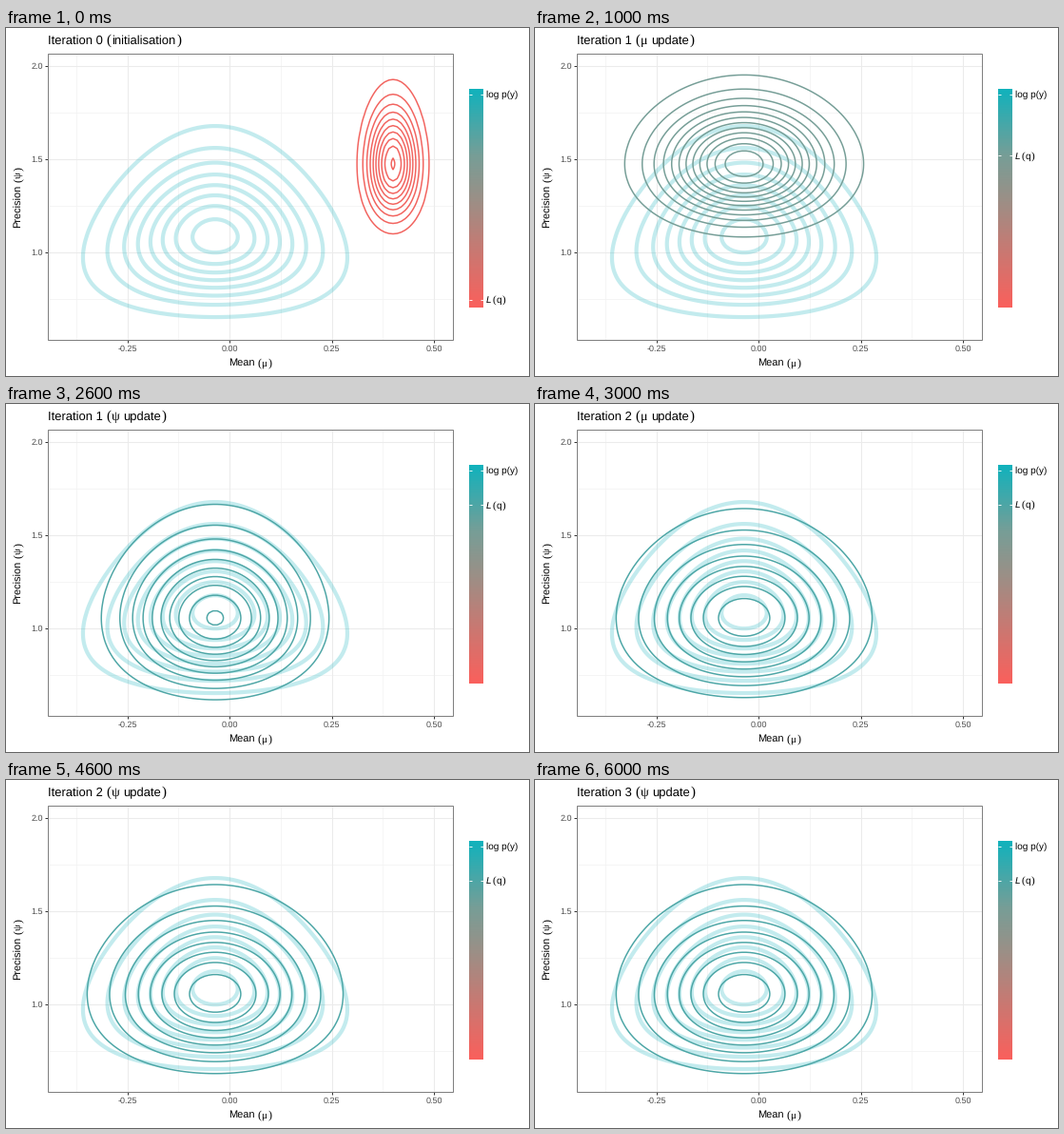
These frames come from a looping animation (550 by 366 pixels, 7 s). A matplotlib script:

```python
import matplotlib.pyplot as plt
import numpy as np
from matplotlib.animation import FuncAnimation
from matplotlib.colors import LinearSegmentedColormap
from matplotlib.patches import Rectangle

W, H, DPI = 550, 366, 100
PT = 72 / DPI  # points per pixel
SANS, SERIF = "Liberation Sans", "Liberation Serif"

plt.rcParams["text.hinting"] = "none"
plt.rcParams["text.hinting_factor"] = 1

TEAL, CORAL = "#11b2bc", "#fa605c"
RAMP = LinearSegmentedColormap.from_list(
    "ramp", [(0, TEAL), (0.3, "#769e97"), (0.5, "#9a9087"), (1, CORAL)])
BAR = (487, 501.5, 64.5, 294.5)  # left, right, top, bottom
LEFT, RIGHT, TOP, BOTTOM = 44, 470, 27, 328

fig = plt.figure(figsize=(W / DPI, H / DPI), dpi=DPI, facecolor="white")
ax = fig.add_axes([0, 0, 1, 1])
ax.set_xlim(0, W)
ax.set_ylim(H, 0)
ax.axis("off")


def px(mu):
    return 235 + 430 * mu


def py(psi):
    return 432 - 196 * psi


def line(x, y, color, width, z):
    ax.plot(x, y, color=color, lw=width * PT, zorder=z,
            solid_capstyle="butt")


def label(x, y, s, size, family=SANS, color="black", **kw):
    return ax.text(x, y, s, fontsize=size * PT, family=family, color=color,
                   va="baseline", zorder=9, **kw)


def panel():
    for mu in np.arange(-0.375, 0.5, 0.25):
        line([px(mu)] * 2, [TOP, BOTTOM], "#f3f3f3", 0.8, 0)
    for psi in (0.75, 1.25, 1.75):
        line([LEFT, RIGHT], [py(psi)] * 2, "#f3f3f3", 0.8, 0)
    for mu in (-0.25, 0, 0.25, 0.5):
        line([px(mu)] * 2, [TOP, BOTTOM], "#ebebeb", 1.07, 1)
        line([px(mu)] * 2, [BOTTOM, BOTTOM + 3], "#333333", 1, 1)
        label(px(mu), 340.3, f"{mu:.2f}", 8.8, color="#4d4d4d", ha="center")
    for psi in (1, 1.5, 2):
        line([LEFT, RIGHT], [py(psi)] * 2, "#ebebeb", 1.07, 1)
        line([LEFT - 3, LEFT], [py(psi)] * 2, "#333333", 1, 1)
        label(39, py(psi) + 3.3, f"{psi:.1f}", 8.8, color="#4d4d4d",
              ha="right")
    ax.add_patch(Rectangle((LEFT, TOP), RIGHT - LEFT, BOTTOM - TOP, fill=False,
                           ec="#7f7f7f", lw=PT, zorder=8))


def axis_titles():
    base = 355.3
    label(233.8, base, "Mean", 11)
    label(264.3, base, "(", 12, SERIF)
    label(268.3, base, "μ", 11.5, SERIF)
    label(275.8, base, ")", 12, SERIF)
    for y, s, size, family in ((210, "Precision", 11, SANS),
                               (161.7, "(", 12, SERIF),
                               (158, "ψ", 11, SERIF),
                               (150.3, ")", 12, SERIF)):
        # rotated text: the right edge of its box is the baseline side
        ax.text(16, y, s, fontsize=size * PT, family=family, rotation=90,
                rotation_mode="anchor", ha="left", va="baseline", zorder=9)


def bar_ticks(y):
    x0, x1 = BAR[:2]
    for a, b in ((x0, x0 + 3), (x1 - 3, x1)):
        line([a, b], [y, y], "white", 0.9, 5)
    return ax.lines[-2:]


def color_bar():
    x0, x1, y0, y1 = BAR
    ax.imshow(np.linspace(0, 1, 256)[:, None], cmap=RAMP, aspect="auto",
              extent=(x0, x1, y1, y0), interpolation="bilinear", zorder=4)
    bar_ticks(69.5)
    label(505, 73.2, "log p(y)", 10)


# Log densities relative to their peaks, on the grid that is contoured
MU, PSI = np.meshgrid(np.linspace(-0.4, 0.5, 91), np.linspace(0.6, 2, 141))
CENTRE = -0.035


def gamma_term(mode, shape):
    r = PSI / mode
    return shape * (np.log(r) - r + 1)


def rings(log_density, peak, **style):
    """Evenly spaced levels 1, 2, ... below a peak of the given height."""
    levels = np.arange(1, int(peak) + 1)
    return ax.contour(px(MU), py(PSI), peak * np.exp(log_density),
                      levels=levels, **style)


def approximation(mean, sd, mode, shape, peak, bar_y):
    color = RAMP((bar_y - BAR[2]) / (BAR[3] - BAR[2]))
    log_q = gamma_term(mode, shape) - ((MU - mean) / sd) ** 2 / 2
    return rings(log_q, peak, colors=[color], linewidths=1.5 * PT, zorder=6)


def title(step):
    number, part = (step + 1) // 2, "ψμ"[step % 2]
    base = 17.3
    items = [label(43.6, base, f"Iteration {number}", 13.2),
             label(105.8, base, "(", 15, SERIF)]
    if step == 0:
        items.append(label(111, base, "initialisation", 13.2))
        end = 179.3
    else:
        start, end = (122, 162.3) if part == "μ" else (123.3, 163.8)
        items += [label(111, base, part, 13.8, SERIF),
                  label(start, base, "update", 13.2)]
    items.append(label(end, base, ")", 15, SERIF))
    return items


def bound_label(y):
    base = y + 3.6
    return [label(505, base, "L", 10, style="italic"),
            label(511.6, base, "(", 11, SERIF),
            label(515.6, base, "q", 10),
            label(521.6, base, ")", 11, SERIF), *bar_ticks(y)]


panel()
axis_titles()
color_bar()
rings(gamma_term(1.086, 19.5) - PSI * (MU - CENTRE) ** 2 / 0.05, 8.55,
      colors=[TEAL], alpha=0.25, linewidths=4.2 * PT, zorder=3)

# mean, sd of mu; mode, shape of psi; peak in levels; height on the bar
START = (0.4, 0.0408, 1.475, 59, 10.13, 285.5)
FIRST_MU = (CENTRE, 0.1293, 1.475, 59, 12.8, 134.3)
FIRST_PSI = (CENTRE, 0.1293, 1.056, 19.04, 10.13, 106)
SETTLED = (CENTRE, 0.1503, 1.056, 19.04, 8.73, 105.5)
STEPS = [START, FIRST_MU, FIRST_PSI] + [SETTLED] * 4

scenes = [[approximation(*q), *title(i), *bound_label(q[-1])]
          for i, q in enumerate(STEPS)]


def draw(step):
    for i, scene in enumerate(scenes):
        for item in scene:
            item.set_visible(i == step)
    return scenes[step]


anim = FuncAnimation(fig, draw, frames=len(STEPS), interval=1000,
                     init_func=lambda: draw(0), repeat=True, repeat_delay=0)
plt.show()
```
